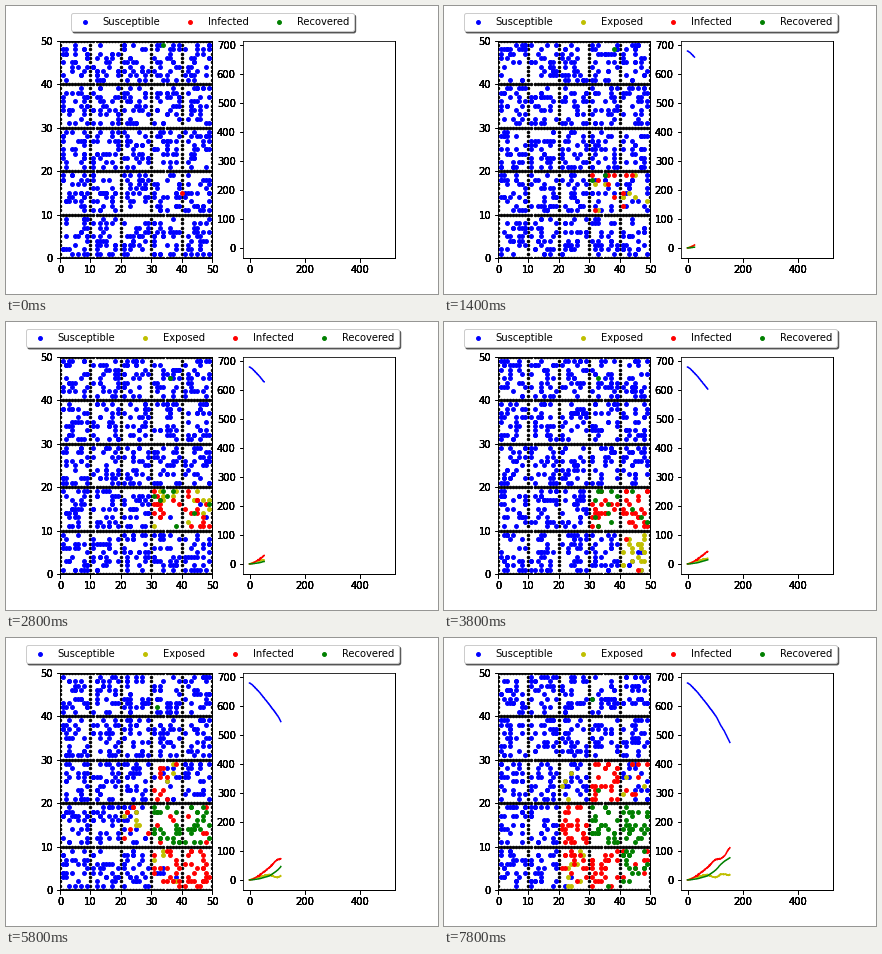
Recreate the animation shown at these times as a matplotlib script. Size 432 by 288 pixels, loop 8000 ms.

```python
import numpy as np
import matplotlib.pyplot as plt
from matplotlib.animation import FuncAnimation

FRAMES, DAYS = 40, 4          # drawn frames, days walked between two of them
PEOPLE, ROOM = 682, 10
GROUPS = [("Susceptible", "b"), ("Exposed", "y"),
          ("Infected", "r"), ("Recovered", "g")]

rng = np.random.default_rng(8)

# Epidemic curves, one value per day
days = np.arange(FRAMES * DAYS)
knots = [0, 9, 37, 73, 97, 105, 120, 133, 153]
exposed, infected, recovered = (
    np.round(np.interp(days, knots, v)).astype(int) for v in (
        [0, 4, 13, 18, 10, 10, 20, 20, 18],
        [1, 2, 17, 45, 68, 72, 74, 83, 112],
        [1, 1, 5, 15, 31, 38, 54, 65, 77]))
wobble = np.round(rng.normal(0, 1.1, len(days))).astype(int) * (days > 30)
exposed, infected = exposed + wobble, infected - wobble
susceptible = PEOPLE - exposed - infected - recovered
curves = [susceptible, exposed, infected, recovered]

# People wander inside their own room of a 5 x 5 block
room = np.stack([np.arange(PEOPLE) % 5, np.arange(PEOPLE) // 5 % 5], axis=1)
local = rng.integers(1, ROOM, (PEOPLE, 2))
room[:2] = (3, 4), (3, 1)
local[:2] = (4, 9), (10, 5)
paths = [room * ROOM + local]
for _ in range(FRAMES - 1):
    for _ in range(DAYS):
        step = rng.integers(-1, 2, (PEOPLE, 2))
        local = np.clip(local + step, 1, ROOM - 1)
    paths.append(room * ROOM + local)

# Order of infection: outward from the first case, room after room
delay = {(3, 1): 0, (4, 1): 0, (4, 0): 15, (3, 0): 45, (2, 1): 48,
         (3, 2): 50, (2, 0): 60, (2, 2): 80, (4, 2): 85}
distance = np.hypot(*(paths[0] - (40, 15)).T)
score = (np.array([delay.get(tuple(r), 400) for r in room.tolist()])
         + 2.5 * distance + 12 * rng.random(PEOPLE))
score[:2] = -2, -1
rank = score.argsort().argsort()
heal = (rank * (1 + 0.5 * rng.random(PEOPLE))).argsort().argsort()


def states(day):
    ill = infected[day] + recovered[day]
    state = np.zeros(PEOPLE, int)
    state[rank < ill + exposed[day]] = 1
    state[rank < ill] = 2
    state[(heal < recovered[day]) & (rank < ill)] = 3
    return state


fig = plt.figure(figsize=(6, 4), dpi=72, facecolor="white")
fig.subplots_adjust(left=0.125, right=0.9, bottom=0.125, top=0.88, wspace=0.2)


def panel(index, xlim, ylim, xticks, yticks):
    # stacked copies give the heavy tick labels
    for _ in range(5):
        ax = fig.add_subplot(1, 2, index)
        ax.set(xlim=xlim, ylim=ylim, xticks=xticks, yticks=yticks)
    return ax


tens = range(0, 51, ROOM)
grid = panel(1, (0, 50), (0, 50), tens, tens)
chart = panel(2, (-25, 525), (-0.05 * PEOPLE, 1.05 * PEOPLE),
              range(0, 401, 200), range(0, 701, 100))

wall = [(x, y) for x in range(51) for y in range(51)
        if x % ROOM == 0 or y % ROOM == 0]
grid.scatter(*zip(*wall), s=6, c="k")
dots = [grid.scatter([], [], s=15, c=c, label=name) for name, c in GROUPS]
lines = [chart.plot([], [], c)[0] for _, c in GROUPS]


def update(n):
    day = max(DAYS * n - 3, 0)
    state = states(day)
    for k, (dot, line) in enumerate(zip(dots, lines)):
        dot.set_offsets(paths[n][state == k])
        shown = day + 1 if n else 0
        line.set_data(days[:shown], curves[k][:shown])
    handles = dots if n else [dots[0], dots[2], dots[3]]
    grid.legend(handles=handles, loc="upper center", bbox_to_anchor=(1, 1.15),
                ncol=4, fancybox=True, framealpha=1, shadow={"alpha": 0.95})
    return dots + lines


anim = FuncAnimation(fig, update, frames=FRAMES, interval=200,
                     repeat=True, repeat_delay=0, blit=False)
plt.show()
```
